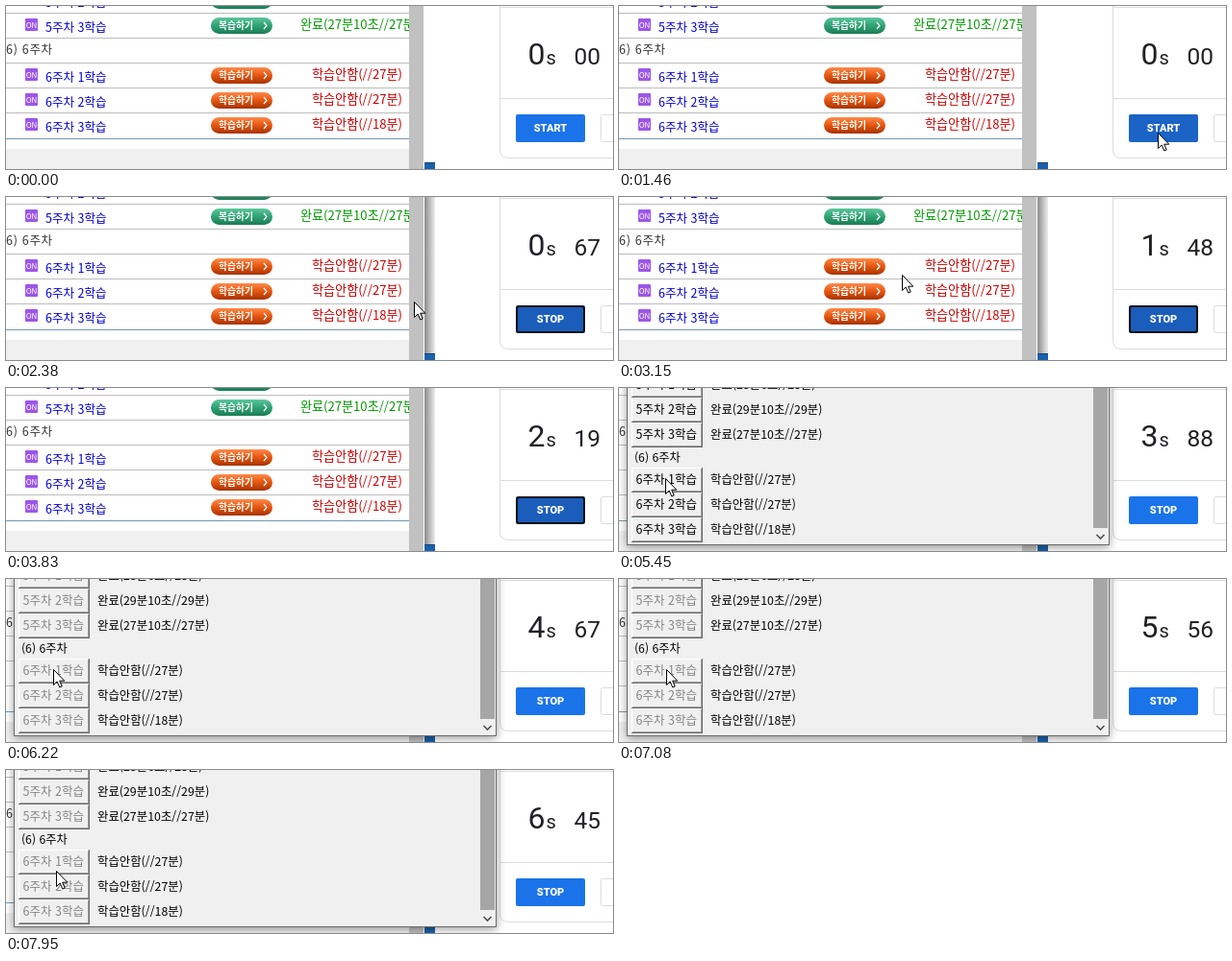
These frames come from a looping animation (631 by 170 pixels, 7.99 s). An HTML page:

```html
<!DOCTYPE html>
<html lang="ko">
<head>
<meta charset="utf-8">
<style>
  html, body { margin: 0; width: 100%; height: 100%; overflow: hidden; background: #fff; }
  svg { display: block; }
  text { font-family: "Noto Sans CJK KR", "Noto Sans CJK", "Noto Sans", sans-serif; font-size: 12.5px; white-space: pre; }
  .watch text { font-family: Roboto, sans-serif; fill: #202124; }
  .watch .label { font-size: 11px; font-weight: 800; fill: #fff; text-anchor: middle; }
  .crisp { shape-rendering: crispEdges; }
  #tool { filter: drop-shadow(0 2px 5px rgba(0, 0, 0, .4)); }
</style>
</head>
<body>
<svg id="stage" width="631" height="170" viewBox="0 0 631 170">
  <defs>
    <linearGradient id="orange" x2="0" y2="1">
      <stop stop-color="#ff8a4a"/><stop offset=".45" stop-color="#e85a14"/><stop offset="1" stop-color="#a83200"/>
    </linearGradient>
    <linearGradient id="green" x2="0" y2="1">
      <stop stop-color="#5cc79c"/><stop offset=".5" stop-color="#2fa274"/><stop offset="1" stop-color="#1c7c56"/>
    </linearGradient>
    <linearGradient id="shade">
      <stop stop-color="#8c8c8c"/><stop offset="1" stop-color="#ececec"/>
    </linearGradient>
    <clipPath id="pageClip"><rect width="419" height="170"/></clipPath>
  </defs>
  <g id="page" clip-path="url(#pageClip)"></g>
  <g class="crisp">
    <rect x="419" width="15" height="170" fill="#c1c1c1"/>
    <rect id="edge" x="435" width="11" height="163" fill="url(#shade)"/>
    <rect x="435" y="163" width="11" height="7" fill="#1961ab"/>
    <rect x="435" y="163" width="11" height="1" fill="#174472"/>
  </g>
  <g class="watch">
    <path d="M513.5 0V150Q513.5 158.5 522 158.5H640M513.5 1.5H640M513.5 96.5H640" fill="none" stroke="#dadce0"/>
    <text id="seconds" x="542.5" y="61" style="font-size:32px"></text>
    <text x="561.5" y="61" style="font-size:20px">s</text>
    <text id="hundredths" x="590.5" y="61" style="font-size:24.5px"></text>
    <rect id="button" x="530" y="113" width="72" height="29" rx="2"/>
    <rect id="focus" x="531" y="114" width="70" height="27" rx="2.5" fill="none" stroke="#101114" stroke-width="2"/>
    <text id="label" class="label" x="566" y="131"></text>
    <rect x="618.5" y="113.5" width="72" height="28" rx="2" fill="#fff" stroke="#dadce0"/>
  </g>
  <g id="tool"></g>
  <path id="cursor" d="M.5 .5V16.5L4.2 13L6.8 19L9.2 18L6.7 12.2H11.8Z" fill="#fff" stroke="#000"/>
</svg>
<script>
const LOOP = 7990, START = 1721, TOOL_OPEN = 3960, TOOL_BUSY = 5700;
const el = id => document.getElementById(id);

const rect = (x, y, w, h, fill, extra = '') =>
  `<rect x="${x}" y="${y}" width="${w}" height="${h}" fill="${fill}" ${extra}/>`;
const text = (x, y, str, fill, extra = '') =>
  `<text x="${x}" y="${y}" fill="${fill}" ${extra}>${str}</text>`;

// [lesson, status, centre in the page, centre in the tool]
const lessons = [
  ['5주차 1학습', '완료(28분6초//28분)', -32, -3],
  ['5주차 2학습', '완료(29분10초//29분)', -6, 23],
  ['5주차 3학습', '완료(27분10초//27분)', 20, 49],
  ['6주차 1학습', '학습안함(//27분)', 72, 96],
  ['6주차 2학습', '학습안함(//27분)', 98, 122],
  ['6주차 3학습', '학습안함(//18분)', 124, 148],
];

function pageRow([name, status, y]) {
  const done = status.startsWith('완료');
  return rect(20, y - 7, 13, 13, '#9d55ea', 'rx="1"')
    + text(26.5, y + 2.5, 'ON', '#fff', 'text-anchor="middle" style="font-size:8px"')
    + text(41, y + 6.5, name, '#0000d0')
    + rect(213, y - 8, 64, 17, `url(#${done ? 'green' : 'orange'})`, 'rx="8.5"')
    + text(221, y + 4, done ? '복습하기' : '학습하기', '#fff', 'style="font-size:9.8px;font-weight:700"')
    + `<path d="M268 ${y - 3}l3 3.5l-3 3.5" fill="none" stroke="#fff" stroke-width="1.2"/>`
    + text(done ? 306 : 318, y + 4, status, done ? '#009a00' : '#c80000', 'style="font-size:13.1px"');
}

function toolRow([name, status, , y]) {
  const top = y - 13;
  return `<g class="crisp">${rect(13, top, 74, 26, '#696969')}${rect(13, top, 73, 25, '#fff')}`
    + `${rect(14, top + 1, 72, 24, '#a0a0a0')}${rect(14, top + 1, 71, 23, '#f0f0f0')}</g>`
    + text(17.5, y + 4, name, '#000', 'class="lesson"')
    + text(95, y + 4, status, '#000', 'style="font-size:12.4px"');
}

el('page').innerHTML =
  rect(0, 149, 419, 21, '#f0f0f0')
  + [7, 33, 59, 85, 111].map(y => rect(0, y, 419, 1, '#bdbdbd', 'class="crisp"')).join('')
  + rect(0, 138, 419, 1, '#7398b4', 'class="crisp"')
  + text(0, 50, '6) 6주차', '#333', 'letter-spacing=".7"')
  + lessons.map(pageRow).join('');

el('tool').innerHTML =
  `<g class="crisp">${rect(8, -20, 502, 184, '#6b6b6b')}${rect(9, -20, 500, 183, '#f0f0f0')}`
  + `${rect(493, -20, 15, 166, '#a6a6a6')}</g>`
  + '<path d="M496.5 153l4 4l4-4" fill="none" stroke="#505050" stroke-width="1.6"/>'
  + lessons.map(toolRow).join('')
  + text(16, 77, '(6) 6주차', '#000', 'style="font-size:12.2px"');
const lessonLabels = document.querySelectorAll('.lesson');

// [ms, x, y] of the pointer tip
const pointerPath = [
  [0, 532, 200], [119, 532, 200], [120, 532, 145], [159, 532, 145], [160, 517, 133],
  [310, 517, 133], [550, 470, 121], [730, 470, 121], [1220, 560, 132], [1850, 560, 132],
  [2250, 436, 112], [3000, 290, 80], [3140, 294, 81], [3450, 294, 81], [3850, 300, -30],
  [4750, 72, -30], [5400, 48, 93.5], [5540, 49, 94], [7500, 49, 94], [7940, 52, 105], [LOOP, 52, 105],
];
// [display tick, hundredths]
const watchRate = [[-30, 0], [1, 148], [27, 271], [52, 388], [88, 556], [107, 645], [108, 650]];

const smooth = u => u * u * (3 - 2 * u);

function along(keys, at, ease = u => u) {
  let i = 0;
  while (i < keys.length - 2 && at >= keys[i + 1][0]) i++;
  const [a, b] = [keys[i], keys[i + 1]];
  const u = ease(Math.min(1, Math.max(0, (at - a[0]) / (b[0] - a[0]))));
  return a.slice(1).map((v, k) => v + (b[k + 1] - v) * u);
}

const show = (id, on) => el(id).setAttribute('visibility', on ? 'visible' : 'hidden');

function draw(t) {
  const tick = Math.floor((t - 3097) / 45.22);
  const count = Math.round(along(watchRate, tick)[0]);
  el('seconds').textContent = Math.floor(count / 100);
  el('hundredths').textContent = String(count % 100).padStart(2, '0');

  const [x, y] = along(pointerPath, t, smooth);
  el('cursor').setAttribute('transform', `translate(${Math.round(x)} ${Math.round(y)})`);

  const focused = t >= START && t < TOOL_OPEN;
  const hovered = x >= 530 && x <= 602 && y >= 113 && y <= 142;
  el('button').setAttribute('fill', focused ? '#1b5dbb' : hovered ? '#1b63c4' : '#1a73e8');
  el('label').textContent = t < START ? 'START' : 'STOP';
  show('focus', focused);
  show('edge', focused);

  show('tool', t >= TOOL_OPEN);
  lessonLabels.forEach(label => label.setAttribute('fill', t < TOOL_BUSY ? '#000' : '#858585'));
}

function frame() {
  draw(performance.now() % LOOP);
  requestAnimationFrame(frame);
}
frame();
</script>
</body>
</html>
```
